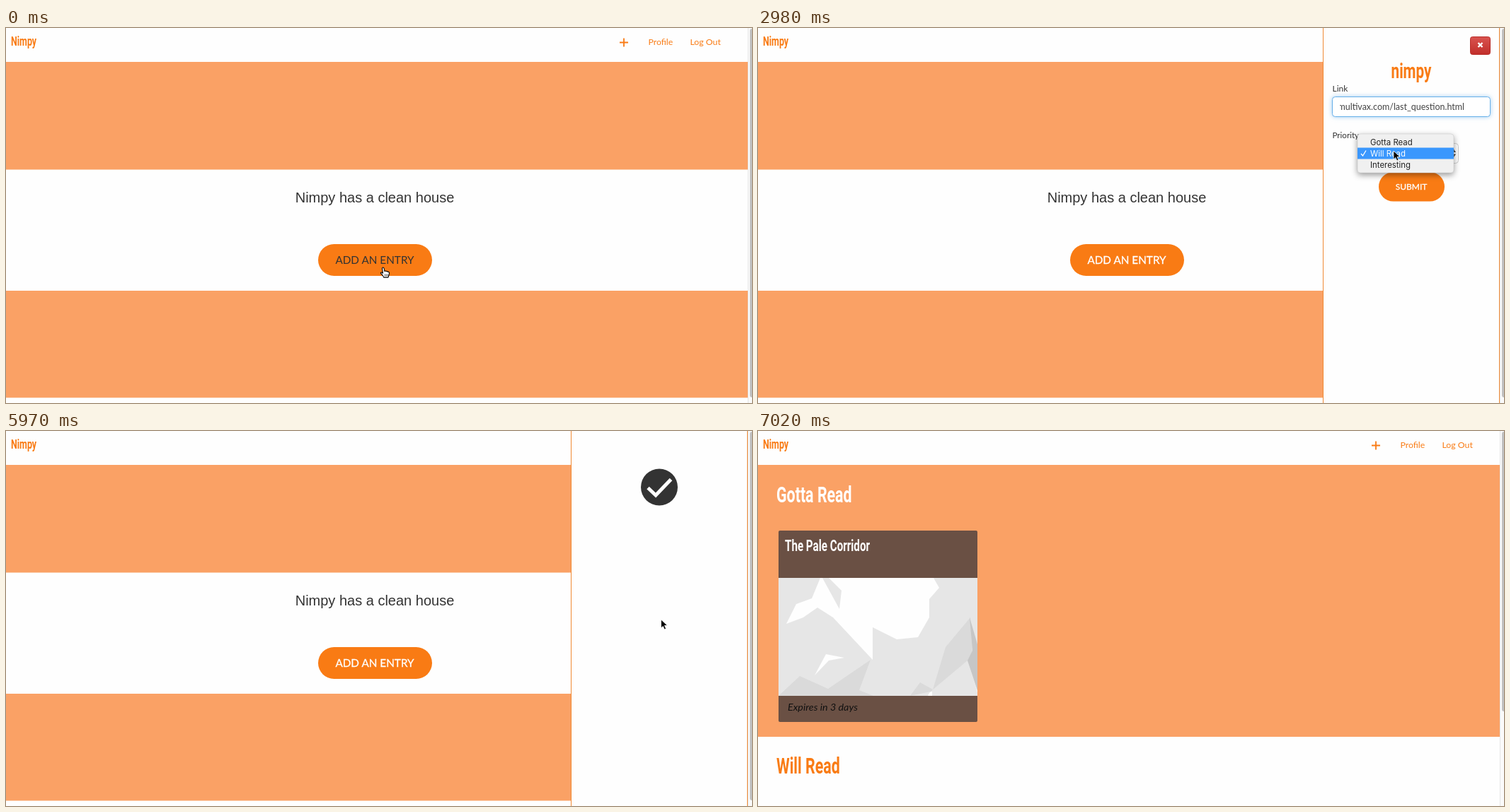
These frames come from a looping animation (1054 by 531 pixels, 8000 ms). An HTML page:

```html
<!DOCTYPE html>
<html lang="en">
<head>
<meta charset="utf-8">
<title>Reading list</title>
<style>
  html, body { margin: 0; width: 100%; height: 100%; overflow: hidden; background: #fefefe; }
  svg { display: block; width: 1054px; height: 531px; font: 12px Lato, sans-serif; fill: #333; }
  .narrow { font-family: Roboto, sans-serif; font-weight: 700; transform: scaleX(.69); transform-box: fill-box; }
  .mid { text-anchor: middle; }
  .orange { fill: #f97b14; }
  .band { fill: #faa165; }
  .white { fill: #fff; }
  .nav { font-size: 12.3px; }
  .field { font-size: 12.5px; }
  .h2 { font-size: 31px; }
  .menu { font: 11.4px Inter, sans-serif; }
  .label { stroke: none; }
  .label.lit { fill: #fff; stroke: #fff; stroke-width: .3px; }
  .box { fill: #fff; stroke: #ccc; }
  .box.focus { stroke: #66afe9; filter: drop-shadow(0 0 3px #66afe999); }
  .box.valid { stroke: #3c763d; }
</style>
</head>
<body>
<svg viewBox="0 0 1054 531">
  <defs>
    <linearGradient id="red" x2="0" y2="1"><stop stop-color="#d9534f"/><stop offset="1" stop-color="#c12e2a"/></linearGradient>
    <clipPath id="page"><rect width="1048" height="531"/></clipPath>
    <clipPath id="inner"><rect x="822" y="99" width="177" height="26"/></clipPath>
    <clipPath id="photo"><rect x="29" y="208" width="281" height="167"/></clipPath>
  </defs>
  <rect width="1054" height="531" fill="#fefefe"/>
  <text class="narrow orange" x="7" y="25" font-size="18.1">Nimpy</text>
  <g id="nav" class="orange nav">
    <path d="M867 20.5h12M873 14.5v12" stroke="#f97b14" stroke-width="1.8"/>
    <text x="907.5" y="23.5">Profile</text>
    <text x="966.5" y="23.5">Log Out</text>
  </g>

  <g id="home">
    <path class="band" d="M0 48h1048v152.500H0zM0 372h1048v151.500H0z"/>
    <text class="mid" x="521" y="247" style="font:20px 'Liberation Sans',Arial,sans-serif">Nimpy has a clean house</text>
    <rect class="orange" x="441" y="306" width="161" height="45" rx="22.500"/>
    <rect id="ring" x="441" y="306.500" width="160.500" height="45" rx="1" fill="none" stroke="#82b6f4" stroke-width="2.500"/>
    <text id="add" class="label mid" x="521" y="334" font-size="15.3">ADD AN ENTRY</text>
  </g>

  <g id="empty">
    <path class="band" d="M0 48h1054v152.500H0zM0 358h1054v151.500H0z"/>
    <text class="narrow white h2" x="26" y="101">Gotta Read</text>
    <text class="narrow orange h2" x="26" y="253">Will Read</text>
    <text class="narrow white h2" x="26" y="410">Interesting</text>
    <text class="narrow orange" x="8" y="536" font-size="18.3">Finn Dorwick</text>
    <circle cx="1025" cy="530" r="13" fill="#1b1b1b"/>
  </g>

  <g id="list">
    <path class="band" d="M0 48h1048v385H0z"/>
    <text class="narrow white h2" x="26" y="101">Gotta Read</text>
    <rect x="29" y="141" width="281" height="271" rx="2" fill="#6a5044"/>
    <text class="narrow white" x="38" y="170" font-size="22">The Pale Corridor</text>
    <g clip-path="url(#photo)">
      <path fill="#e6e6e6" d="M29 208h281v167H29z"/>
      <path fill="#fefefe" d="M88 208h160l8 14-14 16v26l-16 28-30 3-34-17v46l-56-60-22-14-20 14-24 9 14-28 22-8z"/>
      <path fill="#e6e6e6" d="M78 208h13l24 44 3-26-18-18z"/>
      <path fill="#fefefe" d="M80 346l16-30 26 5-22 4zM242 371l53-47 4 18 11 27v6h-70z"/>
      <path fill="#dadada" d="M29 375l30-28 40 18 60-41-16 43 20 8zM215 375l14-19 18 10 18-60 35-42 3 55-50 48z"/>
      <path fill="#e6e6e6" d="M246 367l50-42 4 17 10 28v5h-64z"/>
      <path fill="#c6c6c6" d="M299 264l11 38v65l-14-42 7-14z"/>
    </g>
    <text x="42" y="396" font-size="14.3" font-style="italic" style="fill:#111">Expires in 3 days</text>
    <text class="narrow orange h2" x="26" y="485">Will Read</text>
  </g>

  <g id="scroll">
    <path fill="#fafafa" d="M1048 0h6v531h-6z"/>
    <path d="M1048.500 0v531" stroke="#e6e6e6"/>
    <rect id="thumb" x="1051" y="1" width="6" height="522" rx="3" fill="#c1c1c1"/>
  </g>

  <g clip-path="url(#page)"><g id="panel">
    <path fill="#fefefe" stroke="#f08a35" d="M798.500-1h249v533h-249z"/>
    <g id="form">
      <rect x="1006.500" y="12.500" width="28" height="25" rx="3" fill="url(#red)" stroke="#b92c28"/>
      <path d="M1017.500 21l6 6m0-6l-6 6" stroke="#fff" stroke-width="2.400"/>
      <text class="narrow orange mid" x="923" y="71" font-size="30" style="transform-origin:center">nimpy</text>
      <text x="811.500" y="90">Link</text>
      <rect id="input" class="box" x="811.500" y="97.500" width="223" height="28" rx="4"/>
      <g clip-path="url(#inner)"><text id="link" class="field" y="116"></text></g>
      <path id="tick" d="M1015.500 108l3.500 3.500 7-7.500" fill="none" stroke="#3c763d" stroke-width="2.600"/>
      <text x="811.500" y="156" font-size="11.6">Priority</text>
      <rect id="select" class="box" x="856.500" y="163.500" width="133" height="28" rx="4"/>
      <text id="choice" x="863.500" y="182" font-size="12.3"></text>
      <path d="M980 176l3-4.500 3 4.500zM980 178.500l3 4.500 3-4.500z"/>
      <g id="submit">
        <rect class="orange" x="877" y="204" width="93" height="41.500" rx="20.700"/>
        <text id="send" class="label mid" x="923" y="229">SUBMIT</text>
      </g>
      <g id="popup" class="menu">
        <rect x="847" y="150" width="136" height="55" rx="4" fill="#f0f0f0" stroke="#c4c4c4" stroke-width=".5" style="filter:drop-shadow(0 3px 4px #0006)"/>
        <rect id="bar" x="847" width="136" height="16" fill="#3a97fd"/>
        <text x="865" y="165.500">Gotta Read</text>
        <text x="865" y="181.500">Will Read</text>
        <text x="865" y="197.500">Interesting</text>
        <path id="mark" d="M852 178l2.500 3 4.500-7.500" fill="none" stroke-width="1.300"/>
      </g>
    </g>
    <g id="done">
      <circle cx="923" cy="79.500" r="26"/>
      <path d="M907 80.500l11 10.500 21.500-22.500" fill="none" stroke="#fff" stroke-width="5"/>
    </g>
  </g></g>

  <g id="cursor">
    <path id="arrow" d="M0 0v12l2.800-2.600 2 4.600 2.200-1-2-4.500h4z" fill="#000" stroke="#fff" stroke-width=".8"/>
    <g id="hand" fill="#fff" stroke="#000" stroke-width="1.100" stroke-linejoin="round">
      <path d="M-1 1.500q0-1.500 1.300-1.500 1 0 1.300 1.500l.8 4q2-1 2.600.3 1.700-.7 2.200.7 1.800-.5 1.800 1.600 0 3-1.500 6H1.200Q0 11-2.700 8.800q-1-2 .8-1.800L0 8.200z"/>
      <path d="M3 9.500v3M5 9.500v3M7 9.500v3" stroke-width=".7"/>
    </g>
    <path id="beam" d="M-2.500-6.500q2.500 0 2.500 1.500V5q0 1.500-2.500 1.500M2.500-6.500Q0-6.500 0-5V5q0 1.500 2.500 1.500M-1.500 2.500h3" fill="none" stroke="#111" stroke-width="1.100"/>
  </g>
</svg>
<script>
const LOOP = 8000, URL_TEXT = 'http://multivax.com/last_question.html';
const el = {};
document.querySelectorAll('[id]').forEach(e => el[e.id] = e);

// Stepped tracks: each entry is [start ms, ...values]
const pointer = [
  [0, 'hand', 532.5, 339], [1210, 'hand', 546, 320], [1360, 'arrow', 642, 246],
  [1510, 'arrow', 788, 146], [1650, 'beam', 843, 114], [2390, 'beam', 856, 122],
  [2530, 'arrow', 882, 154], [2680, 'arrow', 898, 174], [3280, 'arrow', 896, 165],
  [3430, 'arrow', 895, 159], [4020, 'arrow', 897, 170], [4170, 'arrow', 902, 191],
  [4320, 'hand', 906, 208], [4470, 'hand', 907, 216], [4620, 'hand', 909, 231],
  [4770, 'hand', 910, 239], [4920, 'arrow', 911, 240], [5970, 'arrow', 925.5, 267]
];
const slide = [[0, 250], [590, 170], [770, 50], [920, 0], [6270, 60], [6420, 180], [6570, 250]];
const formFade = [[0, 1], [4920, .5], [5070, 0]];
const doneFade = [[0, 0], [5070, .5], [5220, 1]];

const at = (track, t) => track.filter(k => k[0] <= t).pop().slice(1);
const show = (e, on) => e.style.display = on ? '' : 'none';
const within = (t, a, b) => t >= a && t < b;

function render(t) {
  const home = t < 6720, list = t >= 7020;
  show(el.home, home);
  show(el.empty, !home && !list);
  show(el.list, list);
  show(el.scroll, home || list);
  el.thumb.setAttribute('height', list ? 396 : 522);
  el.nav.setAttribute('transform', `translate(${home || list ? 0 : 12.5})`);

  show(el.ring, within(t, 590, 1790));
  el.add.classList.toggle('lit', t >= 1790);

  const [x] = at(slide, t);
  show(el.panel, x < 250);
  el.panel.setAttribute('transform', `translate(${x})`);
  el.form.setAttribute('opacity', at(formFade, t)[0]);
  el.done.setAttribute('opacity', at(doneFade, t)[0]);

  const pasted = t >= 2240, valid = t >= 3130, scrolled = pasted && !valid;
  el.input.setAttribute('class', 'box' + (valid ? ' valid' : t >= 1790 ? ' focus' : ''));
  el.link.textContent = pasted ? URL_TEXT : 'www.google.com';
  el.link.setAttribute('x', scrolled ? 998 : 822);
  el.link.setAttribute('text-anchor', scrolled ? 'end' : 'start');
  el.link.style.fill = pasted ? '#444' : '#888';
  show(el.tick, valid);

  el.select.setAttribute('class', 'box' + (valid ? ' focus' : ''));
  el.choice.textContent = t < 3870 ? 'Will Read' : 'Gotta Read';
  el.submit.setAttribute('opacity', pasted ? 1 : .66);
  el.send.classList.toggle('lit', t < 4320);

  show(el.popup, within(t, 2980, 3870));
  const row = t < 3280 ? 1 : 0;
  el.bar.setAttribute('y', 153.5 + row * 16);
  el.popup.querySelectorAll('text').forEach((e, i) => e.style.fill = i === row ? '#fff' : '#222');
  el.mark.setAttribute('stroke', row ? '#fff' : '#222');

  const [kind, cx, cy] = at(pointer, t);
  show(el.cursor, home);
  el.cursor.setAttribute('transform', `translate(${cx} ${cy})`);
  for (const k of ['arrow', 'hand', 'beam']) show(el[k], k === kind);
}

const start = performance.now();
function tick() {
  render((performance.now() - start) % LOOP);
  requestAnimationFrame(tick);
}
tick();
</script>
</body>
</html>
```
